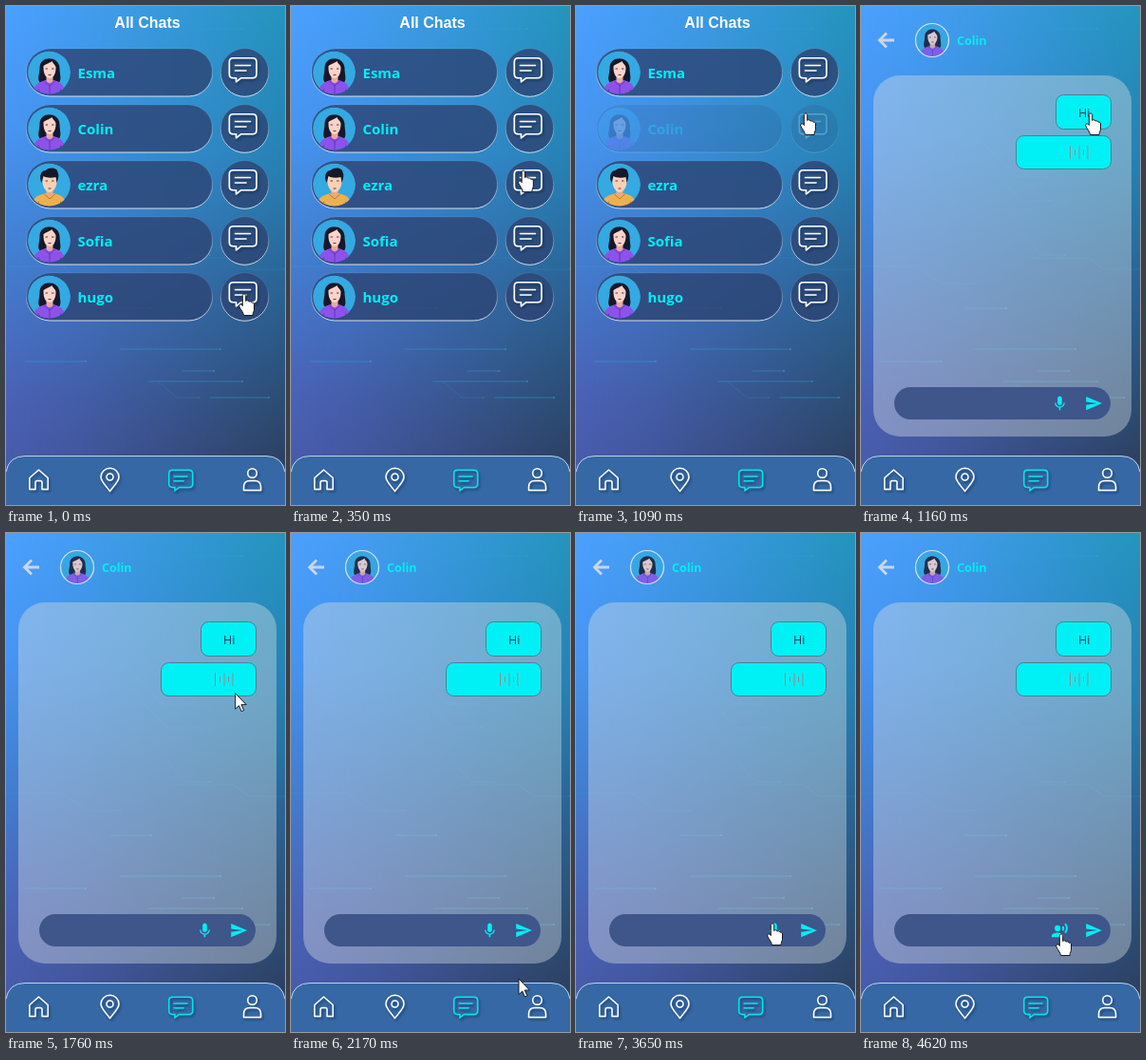
These frames come from a looping animation (294x525 px, 8 s). An HTML page:

```html
<!DOCTYPE html>
<html lang="en">
<head>
<meta charset="utf-8">
<title>Chats</title>
<style>
  html, body { margin: 0; width: 100%; height: 100%; overflow: hidden; background: #3668a6; }
  svg { display: block; width: 100vw; height: 100vh; }
  .name { font-family: "Open Sans", "Noto Sans", sans-serif; font-weight: 700; fill: #00eef4; }
  .line { fill: none; stroke-linecap: round; stroke-linejoin: round; }
</style>
</head>
<body>
<svg id="stage" viewBox="0 0 294 525">
  <defs>
    <linearGradient id="left" x2="0" y2="1">
      <stop stop-color="#4ca0ff"/><stop offset=".25" stop-color="#4795f2"/>
      <stop offset=".5" stop-color="#437fd2"/><stop offset=".78" stop-color="#4b62b6"/>
      <stop offset="1" stop-color="#4658a6"/>
    </linearGradient>
    <linearGradient id="right" x2="0" y2="1">
      <stop stop-color="#2494bd"/><stop offset=".3" stop-color="#2682b3"/>
      <stop offset=".55" stop-color="#2a6495"/><stop offset=".9" stop-color="#2c4263"/>
    </linearGradient>
    <linearGradient id="across">
      <stop stop-color="#000"/><stop offset=".25" stop-color="#333"/><stop offset="1" stop-color="#fff"/>
    </linearGradient>
    <mask id="blend"><rect width="294" height="525" fill="url(#across)"/></mask>
    <linearGradient id="rim" x2="0" y2="1">
      <stop offset=".3" stop-color="#fff" stop-opacity=".08"/><stop offset="1" stop-color="#fff" stop-opacity=".8"/>
    </linearGradient>
    <filter id="shade" x="-30%" y="-30%" width="170%" height="180%">
      <feDropShadow dx="1.5" dy="2" stdDeviation="1.2" flood-color="#0a1c3c" flood-opacity=".55"/>
    </filter>
    <clipPath id="disc"><circle r="22.5"/></clipPath>
    <g id="woman" clip-path="url(#disc)">
      <circle r="22.5" fill="#35a9e1"/>
      <path d="M-8 12C-14 8-10 3-10-5C-10-18 10-18 11-5C11 3 14 8 9 12Z" fill="#14182a"/>
      <path d="M-17 24C-17 12-10 10-4 8H5C11 10 17 12 17 24Z" fill="#8d52ea"/>
      <path d="M-3 3H4V8C4 12-3 12-3 8Z" fill="#eaa999"/>
      <path d="M-6-7C-3-9 2-11 3-12C4-9 7-8 7-5C7 2 4 6 .5 6S-6 2-6-5Z" fill="#fbd3c8"/>
      <path d="M-4-4h2.5M2.5-4H5M-1 2.5H2" stroke="#4a2637" stroke-width=".9"/>
      <path d="M-5 9L.5 14 6 9M.5 14V23M-11 18V23M12 18V23" class="line" stroke="#5c2fae" stroke-width=".8"/>
    </g>
    <g id="man" clip-path="url(#disc)">
      <circle r="22.5" fill="#35a9e1"/>
      <path d="M-18 24C-18 12-10 11-4 9H5C11 11 18 12 18 24Z" fill="#eeb04e"/>
      <path d="M-3 3H4V10C3 13-2 13-3 10Z" fill="#e9a98c"/>
      <path d="M-7-9H8V-3C8 3 4 8 .5 8S-7 3-7-3Z" fill="#fbd0b4"/>
      <path d="M-8-2C-11-8-9-15-4-15C0-19 9-18 9-13C11-10 9-5 8-2L7-8C3-7-3-7-6-9Z" fill="#14182a"/>
      <path d="M-4-4h2.5M2.5-4H5M-1 4H2" stroke="#4a2637" stroke-width=".9"/>
      <path d="M-5 10L.5 15 6 10M-11 18V23M12 18V23" class="line" stroke="#a8702a" stroke-width=".8"/>
    </g>
    <g id="bubble" class="line">
      <path d="M5 .8H25Q29.5.8 29.5 5V17.5Q29.5 21.8 25 21.8H13L8 25.8V21.8H5Q.8 21.8.8 17.5V5Q.8.8 5 .8Z"/>
      <path d="M7 8.5H23M7 14H18.5"/>
    </g>
  </defs>

  <rect width="294" height="525" fill="url(#left)"/>
  <rect width="294" height="525" fill="url(#right)" mask="url(#blend)"/>
  <g id="circuit" class="line" stroke="#2fb4e6" stroke-width=".7"></g>

  <g id="list">
    <text x="149" y="23" text-anchor="middle" font-family="'Liberation Sans', Arial, sans-serif" font-weight="700" font-size="16" fill="#fff">All Chats</text>
  </g>

  <g id="chat">
    <path d="M35 36H20M27 28.5L19.500 36 27 43.500" class="line" stroke="#cbd6ec" stroke-width="2.800" style="stroke-linecap:butt;stroke-linejoin:miter"/>
    <use href="#woman" transform="translate(75 36) scale(.78)" opacity=".82"/>
    <circle cx="75" cy="36" r="17.500" fill="none" stroke="#d5e2f2" stroke-width="1.200"/>
    <text id="peer" class="name" x="101" y="41" font-size="12.500"></text>
    <rect x="13" y="73" width="272" height="380" rx="28" fill="#d6dfe2" fill-opacity=".4"/>
    <g fill="#00f1f5" stroke="#4f7f92">
      <rect x="205.500" y="93.500" width="58" height="36" rx="8"/>
      <rect x="163.500" y="136.500" width="100" height="35" rx="8"/>
    </g>
    <text x="229" y="117" font-family="'Open Sans', 'Noto Sans', sans-serif" font-size="12.500" fill="#343a52">Hi</text>
    <path d="M220.500 147V161M225.500 151V157M230 147.500V161M234.500 151V157M239 147V161" stroke="#8f8d95" stroke-width="1"/>
    <rect x="35" y="401" width="228" height="34" rx="17" fill="#3e568a"/>
    <g fill="#00eef4">
      <path id="mic" transform="translate(200.2 409) scale(.77)" d="M12 14c1.660 0 3-1.340 3-3V5c0-1.660-1.340-3-3-3S9 3.340 9 5v6c0 1.660 1.340 3 3 3zm5.300-3c0 3-2.540 5.100-5.300 5.100S6.700 14 6.700 11H5c0 3.410 2.720 6.230 6 6.720V21h2v-3.280c3.280-.48 6-3.300 6-6.720z"/>
      <g id="voice" transform="translate(200.2 409) scale(.77)">
        <circle cx="9" cy="9" r="4"/>
        <path d="M9 15c-2.670 0-8 1.340-8 4v2h16v-2c0-2.660-5.330-4-8-4zM16.760 5.360l-1.680 1.690c.84 1.180.84 2.710 0 3.890l1.680 1.690c2.020-2.020 2.020-5.070 0-7.270zM20.070 2l-1.630 1.630c2.770 3.020 2.770 7.560 0 10.740L20.070 16c3.900-3.890 3.910-9.950 0-14z"/>
      </g>
      <path transform="translate(235.600 408.500) scale(.8)" d="M2 21L23 12 2 3V10l15 2-15 2z"/>
    </g>
  </g>

  <path d="M0 525V490Q3 473.500 20 473.500H274Q291 473.500 294 490V525Z" fill="#3568a5"/>
  <path d="M0 490Q3 473.500 20 473.500H274Q291 473.500 294 490" class="line" stroke="#c3d3e6"/>
  <g class="line" stroke="#fff" stroke-width="1.500" filter="url(#shade)">
    <path d="M24.800 496.500L34.500 488 44.200 496.500V508.500H38V501.500Q38 499.500 36 499.500H33Q31 499.500 31 501.500V508.500H24.800Z"/>
    <path d="M109.500 510.500C105 504.500 100 500 100 495.500A9.500 9.200 0 0 1 119 495.500C119 500 114 504.500 109.500 510.500Z"/>
    <circle cx="109.500" cy="495.500" r="3.500"/>
    <circle cx="259.500" cy="491.500" r="4.800"/>
    <path d="M250.500 509.500V506Q250.500 499.500 257 499.500H262Q268.500 499.500 268.500 506V509.500Z"/>
    <use href="#bubble" transform="translate(171 487.500) scale(.87)" stroke="#00e6ea" stroke-width="1.700"/>
  </g>

  <circle id="tap" r="12" fill="#c3cb2c" opacity=".8"/>
  <g id="cursor" fill="#fff" stroke="#15181f" stroke-linejoin="round">
    <path id="hand" d="M-1.700 1.500C-1.700-.5 1.700-.5 1.700 1.500V7.500C2.200 6.300 4.800 6.600 5 8.200 5.600 7.400 7.700 7.800 8 9.300 8.800 8.700 10.500 9.200 10.500 11V16C10.500 18.500 9 19.500 9 22.500H-.5C-.5 20-4 16-5.300 13-6 11-3.500 9.700-1.700 12.500Z"/>
    <path id="arrow" d="M0 0V16.500L3.800 13 6.400 19 8.900 17.900 6.300 12H11.500Z"/>
  </g>
</svg>

<script>
const $ = id => document.getElementById(id);
const LOOP = 8000, TICK = 67.7;
const people = ['Esma', 'Colin', 'ezra', 'Sofia', 'hugo'];

// circuit traces: "path", each ending in a small node
const traces = [
  'M20 374H84', 'M120 361H226', 'M150 395H249', 'M186 384H219', 'M110 318H153',
  'M215 412H277', 'M180 265H240L256 277H294', 'M145 180L170 205H200', 'M0 274H60L84 292H120',
  'M130 145L165 180H196', 'M160 395L180 412H203', 'M190 24H249', 'M170 240L190 262H215'
];
$('circuit').innerHTML = traces.map((d, i) => {
  const x = d.match(/H(\d+)$/)[1], y = d.match(/[ ](\d+)H\d+$/)[1];
  return `<g opacity="${i < 6 ? .55 : .25}"><path d="${d}"/><circle cx="${x}" cy="${y}" r=".8" fill="#4fd0f5" stroke="none"/></g>`;
}).join('');

const row = (name, i) => `
  <g id="row${i}" transform="translate(0 ${59 * i})">
    <g fill="#2c4474" fill-opacity=".8" stroke="url(#rim)">
      <rect x="21.500" y="45" width="196" height="50" rx="25"/>
      <circle cx="251.500" cy="70" r="25.300"/>
    </g>
    <use href="#${i === 2 ? 'man' : 'woman'}" x="45.500" y="70"/>
    <text class="name" x="75.500" y="76" font-size="15">${name}</text>
    <use href="#bubble" x="234.500" y="54" stroke="#fff" stroke-width="1.600" filter="url(#shade)"/>
  </g>`;
$('list').insertAdjacentHTML('beforeend', people.map(row).join(''));
$('peer').textContent = people[1];

const clamp = v => Math.min(1, Math.max(0, v));
const mix = (a, b, p) => a + (b - a) * p;
const smooth = p => p * p * (3 - 2 * p);
const easeOut = p => p * (2 - p);
const show = (id, on) => $(id).setAttribute('visibility', on ? 'inherit' : 'hidden');

function pointer(t) {
  const n = Math.floor(t / TICK + .1);
  if (n < 24) {
    const p = smooth(clamp(n / 8));
    return [mix(251, 242, p), mix(303, 113, p), true];
  }
  if (n < 38) {
    const p = smooth((clamp((n - 24) / 8)));
    return [mix(242, 240, p), mix(113, 469, p), p < .05];
  }
  if (t < 4570) {
    const p = clamp((n - 38) / 8), y = mix(469, 411, easeOut(p));
    return [mix(240, 207, p), y, y < 436];
  }
  return t < 4620 ? [209, 417, true] : [211, 422, true];
}

function draw(t) {
  const inChat = t >= 1160;
  show('list', !inChat);
  show('chat', inChat);
  show('mic', inChat && t < 4570);
  show('voice', inChat && t >= 4570);

  const step = Math.floor(t / TICK + .1);
  $('row1').setAttribute('opacity', mix(1, .2, clamp((step - 12.300) / 3.700)));

  const second = t >= 3380;
  show('tap', (t >= 750 && t < 1020) || (second && t < 3615));
  $('tap').setAttribute('transform', second ? 'translate(207 410)' : 'translate(242 112)');

  const [x, y, hand] = pointer(t);
  $('cursor').setAttribute('transform', `translate(${x} ${y})`);
  show('hand', hand);
  show('arrow', !hand);
}

const start = performance.now();
function frame() {
  draw((performance.now() - start) % LOOP);
  requestAnimationFrame(frame);
}
frame();
</script>
</body>
</html>
```
